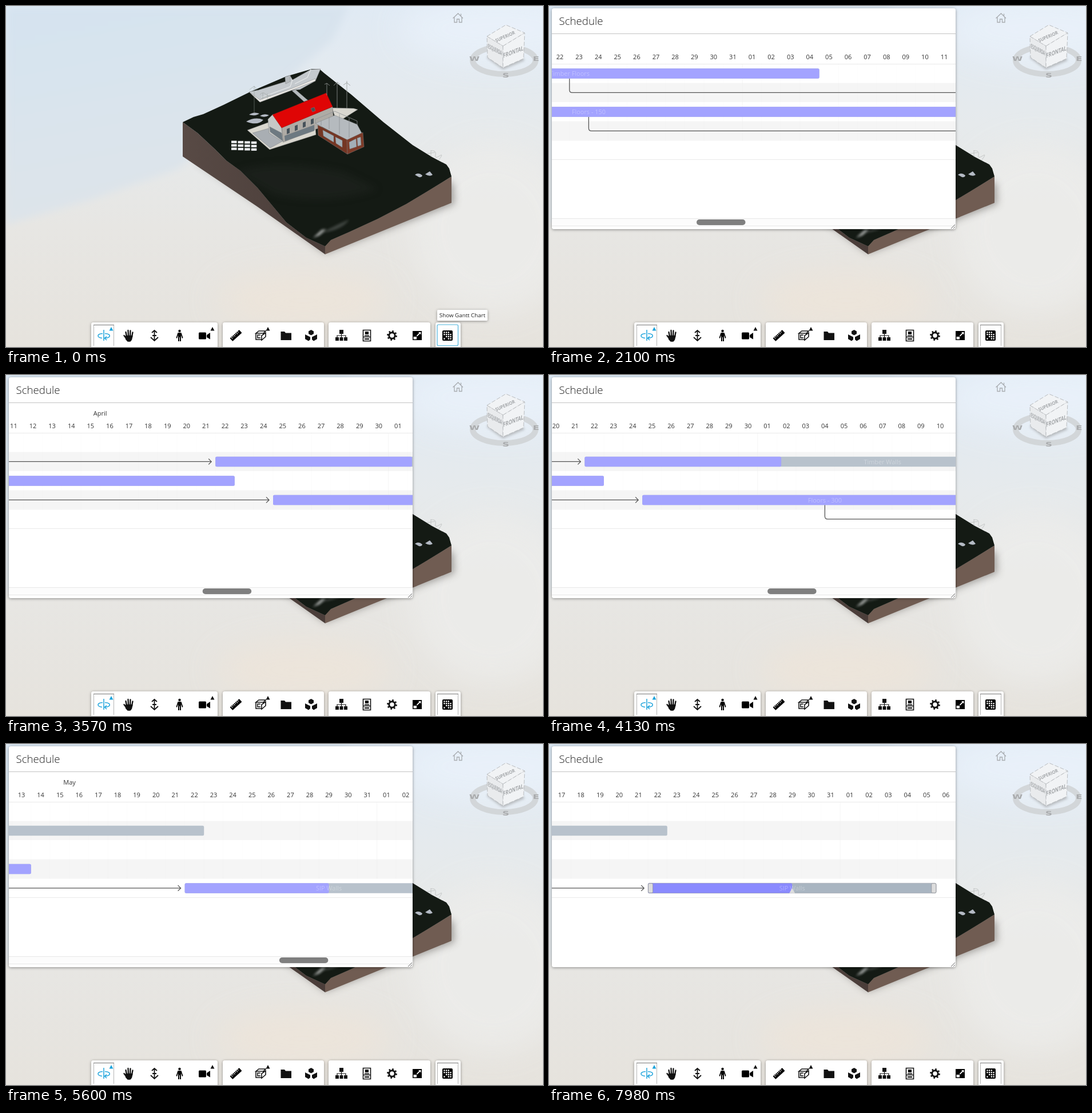
Animation of 939 by 596 pixels, one loop 8000 ms. Source, as an HTML page:

```html
<!DOCTYPE html>
<html lang="en">
<head>
<meta charset="utf-8">
<title>Schedule viewer</title>
<style>
html, body { margin: 0; width: 100%; height: 100%; overflow: hidden; background: #e6e5e2; }
svg { display: block; width: 100vw; height: 100vh; }
text { font-family: "Open Sans", "Noto Sans", sans-serif; }
.mid { text-anchor: middle; }
.date { font-size: 11px; fill: #333; text-anchor: middle; }
.label { font-size: 10.9px; fill: #fff; fill-opacity: .32; text-anchor: middle; }
.compass { font: bold 11px "DejaVu Sans", sans-serif; fill: #a9abad; text-anchor: middle; }
.face { font-weight: 700; fill: #a3a6a9; text-anchor: middle; }
.ink { fill: none; stroke: #111; }
</style>
</head>
<body>
<svg viewBox="0 0 939 596" xmlns="http://www.w3.org/2000/svg">
<defs>
  <linearGradient id="sky" x1="0" y1="0" x2="0" y2="1">
    <stop offset="0" stop-color="#e0eaf4"/><stop offset=".35" stop-color="#e6eaec"/>
    <stop offset=".65" stop-color="#e7e6e3"/><stop offset="1" stop-color="#e6e3dd"/>
  </linearGradient>
  <linearGradient id="blue" x1="0" y1="0" x2=".3" y2="1">
    <stop offset="0" stop-color="#d5e3f0"/><stop offset="1" stop-color="#dee4e9"/>
  </linearGradient>
  <linearGradient id="side" x1="0" y1="0" x2="1" y2="0">
    <stop offset="0" stop-color="#584a45"/><stop offset="1" stop-color="#4a3d39"/>
  </linearGradient>
  <filter id="b2" x="-50%" y="-50%" width="200%" height="200%"><feGaussianBlur stdDeviation="2"/></filter>
  <filter id="b7" x="-50%" y="-50%" width="200%" height="200%"><feGaussianBlur stdDeviation="7"/></filter>
  <filter id="b30" x="-50%" y="-50%" width="200%" height="200%"><feGaussianBlur stdDeviation="26"/></filter>
  <filter id="drop" x="-10%" y="-20%" width="120%" height="150%"><feDropShadow dx="0" dy="1" stdDeviation="2.5" flood-opacity=".4"/></filter>
  <clipPath id="view"><rect x="5" y="49" width="706" height="322"/></clipPath>
  <clipPath id="land"><path d="M309 203L328 194 345 189 380 173 427 150 490 123 535 110 548 110 556 117 604 155 660 203 711 243 745 264 770 277 775 284 779 298 735 325 700 346 650 372 600 395 568 409 558 420 525 405 490 378 440 318 410 288 385 270 365 250 335 222Z"/></clipPath>
</defs>

<rect width="939" height="596" fill="url(#sky)"/>
<path d="M0 0H600L570 60 430 180 300 285 150 338 0 382Z" fill="url(#blue)" filter="url(#b7)"/>
<ellipse cx="860" cy="40" rx="170" ry="60" fill="#eaf2fb" opacity=".8" filter="url(#b30)"/>
<ellipse cx="850" cy="390" rx="140" ry="150" fill="#ededeb" opacity=".8" filter="url(#b30)"/>
<ellipse cx="520" cy="515" rx="150" ry="50" fill="#efe5d9" opacity=".7" filter="url(#b30)"/>

<!-- terrain -->
<path d="M330 270L440 345 558 432 784 346 782 310 600 260Z" fill="#4e4844" opacity=".5" filter="url(#b7)"/>
<path d="M309 203L335 222 365 250 385 270 410 288 440 318 490 378 525 405 558 420V434L440 351 309 263Z" fill="url(#side)"/>
<path d="M558 420L568 409 600 395 650 372 700 346 735 325 779 298V344L558 434Z" fill="#705c52"/>
<g clip-path="url(#land)">
  <rect x="300" y="100" width="490" height="330" fill="#141a14"/>
  <path d="M400 290Q470 265 590 290L650 320Q560 350 470 330Z" fill="#262a27" opacity=".4" filter="url(#b7)"/>
  <path d="M532 408Q565 388 600 373Q590 390 556 396Z" fill="#777b79" opacity=".45" filter="url(#b2)"/>
  <path d="M537 405L552 391 560 390 548 401Z" fill="#c9cbca" opacity=".8" filter="url(#b2)"/>
</g>

<!-- buildings -->
<g stroke="#7c7f80" stroke-width=".5" stroke-linejoin="round">
  <path d="M425 150L441 147 489 132 488 124 497 122 501 129 533 111 550 110 541 131 514 146 500 147 444 168Z" fill="#c4c9cd"/>
  <path d="M425 150L444 164 500 144 541 127V131L500 147 444 168Z" fill="#eceae6"/>
  <path d="M488 124L497 121V132L489 136ZM500 148L506 146 528 165 521 167Z" fill="#b5babd"/>
  <path d="M533 111L527 125 505 136M501 129L497 141 446 160" fill="none" stroke="#eef0f0" stroke-width="1"/>
  <path d="M570 178L608 179 615 181 588 198 576 196Z" fill="#d9d7d0"/>
  <path d="M422 217L460 203 462 214 486 230 541 213 542 225 461 251Z" fill="#d9d7cf"/>
  <path d="M431 222L459 214 488 234 462 248Z" fill="#a9aeb3"/>
  <path d="M458 198L467 189 482 212 485 238 460 222Z" fill="#c6c8c6"/>
  <path d="M482 212L571 176 573 203 485 238Z" fill="#aeaba5"/>
  <path d="M461 211L482 222 484 236 462 220ZM487 227L539 208V218L488 236Z" fill="#6d7981"/>
  <path d="M466 190L560 152 571 176 482 213Z" fill="#df0505" stroke="#8f1512"/>
  <path d="M533 179L539 177 541 183 536 185Z" fill="#4a4e52"/>
  <path d="M541 205L575 191 614 207 622 222 597 235Z" fill="#b5babe"/>
  <path d="M545 208L597 234V259L546 226Z" fill="#743624"/>
  <path d="M596 234L624 221 626 246 597 259Z" fill="#7d3b28"/>
  <path d="M554 217L573 227V238L555 227ZM576 229L588 235V247L577 240ZM600 238L612 232 613 246 601 250ZM614 231L620 229 621 243 615 245Z" fill="#a3afb7"/>
  <path d="M541 205L541 198 575 184 614 201V208M551 200V209M565 194V215M583 189V224M600 196V230" fill="none" stroke="#8d9295" stroke-width=".8"/>
</g>
<g id="windows" fill="#47525a"></g>
<g id="solar" fill="#f0f2f5"></g>
<path d="M425 190Q433 184 443 188Q437 193 425 190ZM444 192Q452 187 460 191Q452 196 444 192ZM420 202Q436 193 450 199Q440 210 420 202ZM715 295Q721 290 728 296Q727 300 722 299ZM733 294L741 289 746 295Q741 299 733 294Z" fill="#b4bac4"/>
<g fill="none" stroke="#969b98" stroke-width=".8">
  <path d="M561 156V135M557 137L561 135 566 139M579 178V133M573 139L579 133 584 137M596 179V134M590 138L596 134 602 139M596 134V131"/>
  <path d="M434 187V140L426 146M434 140L441 149M444 155Q449 149 454 154T463 157M446 161L462 155M449 152V163M457 153V164" opacity=".65"/>
  <path d="M743 264V252M736 258L750 256M743 253Q753 252 751 260T758 262 756 270" opacity=".55"/>
</g>

<!-- home and view cube -->
<path d="M781.500 21.500L790.500 13 799 21.500M784 20V28.500H788.500V23H792.500V28.500H797V20M795.500 17V13.500" fill="none" stroke="#a8acb0" stroke-width="1.300"/>
<ellipse cx="871" cy="95" rx="55" ry="24" fill="none" stroke="#cdcfd0" stroke-width="10" opacity=".75"/>
<path d="M841 91L869 111 907 95 900 86 846 84Z" fill="#888" opacity=".5" filter="url(#b2)"/>
<g fill="#f1f3f5" stroke="#babdc0" stroke-width="1" stroke-dasharray="7 3" stroke-linejoin="round">
  <path d="M841 53L874 33 907 47 869 70Z"/>
  <path d="M841 53L869 70V108L842 90Z" fill="#e9ebed"/>
  <path d="M869 70L907 47 905 92 869 108Z"/>
</g>
<text class="face" font-size="10" transform="matrix(.68 -.3 .35 .75 874 56)">SUPERIOR</text>
<text class="face" font-size="11" transform="matrix(.42 .22 0 1 855 80)">ESQUERDA</text>
<text class="face" font-size="11" transform="matrix(.7 -.27 0 1 887 84)">FRONTAL</text>
<text class="compass" transform="matrix(1.500 0 0 1 819 96)">W</text>
<text class="compass" transform="matrix(1.500 0 0 1 927 96)">E</text>
<text class="compass" transform="matrix(1.500 0 0 1 874 125)">S</text>

<!-- toolbar -->
<g fill="#fff" filter="url(#drop)">
  <rect x="149" y="553" width="221" height="50" rx="4"/><rect x="379" y="553" width="177" height="50" rx="4"/>
  <rect x="564" y="553" width="178" height="50" rx="4"/><rect x="751" y="553" width="44" height="50" rx="4"/>
</g>
<path d="M153.500 594V557.500H188.500V594" fill="#fff" stroke="#b5b5b5"/><path d="M153 557.500H189" stroke="#777"/>
<g id="pressed"><path d="M754.500 594V557.500H790.500V594" fill="#fff" stroke="#b5b5b5"/><path d="M754 557.500H791" stroke="#777"/></g>
<rect id="focus" x="754" y="557" width="36.500" height="36.500" rx="2" fill="none" stroke="#4db3dc" stroke-width="1.200"/>
<path d="M184 561L187.500 567.500H180.500Z" fill="#1fa4dc"/>
<path d="M361 561L364.500 567.500H357.500ZM458 561L461.500 567.500H454.500Z" fill="#111"/>
<path transform="translate(171 576)" d="M-3 4.500C-13 3-12-3-2-3.500M2-3.500C13-3 13 4 2 4.500M0-10V9M5 1.500L1.500 4.500 5 8" fill="none" stroke="#1fa4dc" stroke-width="1.500"/>
<g transform="translate(215 576)" fill="none" stroke="#111" stroke-width="2.300" stroke-linecap="round" stroke-linejoin="round">
  <path d="M-4 2L-5.500-6M-1 1L-1.500-9M2 1L2.500-8.500M5 2L6.500-5.500M-4 6L-8.500 0"/>
  <path d="M-5 1H5.500L4 7 2 9.500H-2L-5 6Z" fill="#111"/>
</g>
<path class="ink" d="M259.500 568V584M255 571L259.500 567 264 571M253 579L259.500 585 266 579M256 576H263" stroke-width="1.800"/>
<g transform="translate(303.500 576)"><circle cy="-8" r="2.200"/><path d="M-3-5H3L6 4 4.500 5 2.500-1V10H.5V3H-.5V10H-2.500V-1L-4.500 5-6 4Z"/></g>
<g transform="translate(347 576)"><rect x="-10" y="-5.500" width="13" height="12" rx="1.500"/><path d="M4-1L10-5V6.500L4 3Z"/></g>
<g transform="translate(402 576) rotate(-42)"><rect x="-11" y="-3.500" width="22" height="7" rx=".8"/><path d="M-8-3.500V0M-5-3.500V-1M-2-3.500V0M1-3.500V-1M4-3.500V0M7-3.500V-1" stroke="#fff"/></g>
<path class="ink" d="M437 572L442 568H454L450 572ZM437 572V583H447M450 572V575M447 576L454 571V578L447 584ZM445 575H440V580H445" stroke-width="1.600"/>
<path d="M480.500 569H487L489 571.500H499V584H480.500Z" fill="#111"/>
<path d="M533.500 566L538 568.500V573L533.500 575.500 529 573V568.500ZM523 574L528 576.500 532 578.500V583L529 585.500 523 582ZM544 574L539 576.500 535 578.500V583L538 585.500 544 582Z" fill="#111"/>
<path d="M583 566H590V573H583ZM576 579H582V585H576ZM583.500 579H589.500V585H583.500ZM591 579H597V585H591Z" fill="#111"/>
<path class="ink" d="M586.500 573V579M579 579V576H594V579" stroke-width="1.200"/>
<path class="ink" d="M624.500 566.500H637.500V585.500H624.500ZM624.500 578.500H637.500" stroke-width="1.600"/><path d="M628 569H634V574H628ZM627 575.500H635V577H627ZM627 581H635V583H627Z"/>
<circle class="ink" cx="675" cy="576" r="5.200" stroke-width="3"/>
<circle class="ink" cx="675" cy="576" r="7.500" stroke-width="2.800" stroke-dasharray="2.600 3.290"/>
<path d="M711 568H727V584H711Z"/><path d="M712.500 578H718V582.500H712.500ZM721 570H725.500V574.500L723.800 572.800 719 577.500 717.800 576.300 722.500 571.500Z" fill="#fff"/>
<rect x="763" y="567" width="18" height="18" rx="2"/><g id="dots" fill="#fff"></g>
<g id="tip"><rect x="754" y="531" width="88" height="19" rx="2" fill="#fff" filter="url(#drop)"/><text class="mid" x="798" y="544" font-size="9.800" fill="#222">Show Gantt Chart</text></g>

<!-- schedule panel -->
<g id="panel">
  <rect x="5" y="4" width="706" height="386" rx="4" fill="#fff" filter="url(#drop)"/>
  <text x="17.500" y="33" font-size="18.700" font-weight="300" fill="#222">Schedule</text>
  <path d="M5 48.500H711" stroke="#c3c3c3"/>
  <path d="M5 134.500H711V168H5ZM5 201.500H711V235.500H5Z" fill="#f5f5f5"/>
  <path d="M5 101.500H711M5 268.500H711" stroke="#e9e9e9"/>
  <g clip-path="url(#view)"><g id="chart"></g></g>
  <g id="bar">
    <path d="M5 371.500H711V384.500H5" fill="#fcfcfc" stroke="#e7e7e7"/>
    <rect id="thumb" y="373" width="85.500" height="10" rx="5" fill="#7f7f7f"/>
  </g>
  <path d="M703 389L710 382M707 389L710 386" stroke="#555" stroke-width=".9"/>
</g>
</svg>
<script>
const $ = id => document.getElementById(id);
const DAY = 33.6, LOOP = 8000, STEP = 70;
const rowY = row => 109.2 + row * 33.5;

function add(parent, tag, attrs, text) {
  const el = document.createElementNS("http://www.w3.org/2000/svg", tag);
  for (const k in attrs) el.setAttribute(k, attrs[k]);
  if (text) el.textContent = text;
  return parent.appendChild(el);
}

// Small repeated details
for (let r = 0; r < 3; r++) for (let c = 0; c < 4; c++)
  add($("solar"), "rect", { x: 394 + c * 11.6, y: 235.5 + r * 6 + c * .4, width: 9.5, height: 4.2 });
for (let i = 0; i < 4; i++)
  add($("windows"), "path", { d: `M${491 + i * 14} ${215 - i * 5.6}l5 -2v9l-5 2z` });
for (let r = 0; r < 4; r++) for (let c = 0; c < 4; c++)
  if ((r * 3 + c * 2) % 5 !== 1)
    add($("dots"), "rect", { x: 765.3 + c * 3.7, y: 569.3 + r * 3.7, width: 2.3, height: 2.3 });

// Chart: positions are counted in days from 21 February
const chart = $("chart");
for (let n = -30; n < 125; n++) {
  const day = new Date(Date.UTC(2021, 1, 21 + n)).getUTCDate();
  const edge = (n - .5) * DAY;
  add(chart, "path", { d: `M${edge} 101V235.500`, stroke: "#eee", "stroke-width": day === 1 ? .6 : .12 });
  add(chart, "text", { x: n * DAY, y: 93, class: "date" }, String(day).padStart(2, "0"));
}
[["February", -5.5], ["March", 22.5], ["April", 53.5], ["May", 83.5], ["June", 114.5]]
  .forEach(([name, at]) => add(chart, "text", { x: at * DAY, y: 71, class: "date" }, name));

const tasks = [
  ["Timber Floors", 16.5, 42.5, 1],
  ["Timber Walls", 59.5, 90.5, .33],
  ["Floors - 150", .5, 60.5, 1],
  ["Floors - 300", 62.5, 81.5, 1],
  ["SIP Walls", 89.5, 104.5, .5]
];
[[0, 1], [2, 3], [3, 4]].forEach(([a, b]) => {
  const x = (tasks[a][1] + tasks[a][2]) / 2 * DAY, tip = tasks[b][1] * DAY - 7, y = rowY(b) + 8.7;
  add(chart, "path", {
    d: `M${x} ${rowY(a) + 17}V${y - 5}q0 5 5 5H${tip}m-5 -5l5 5l-5 5`,
    fill: "none", stroke: "#555", "stroke-width": 1.3
  });
});
const boxes = tasks.map(([name, from, to, done], row) => {
  const x = from * DAY, w = (to - from) * DAY, y = rowY(row);
  const rect = (width, fill) => add(chart, "rect", { x, y, width, height: 17.5, rx: 2.5, fill });
  const parts = { base: rect(w, "#b8c2cc"), done: rect(w * done, "#a3a3ff") };
  if (row === 4) {
    parts.grips = add(chart, "g", { fill: "#ddd", stroke: "#8b8f94", "stroke-width": .7, opacity: 0 });
    add(parts.grips, "rect", { x, y, width: w, height: 17.5, rx: 2.5, fill: "none", "stroke-opacity": .6 });
    for (const gx of [x + .4, x + w - 8.4])
      add(parts.grips, "rect", { x: gx, y: y + .5, width: 8, height: 16.5, rx: 2 });
    const end = x + w * done;
    add(parts.grips, "path", { d: `M${end - 5} ${y + 17.5}h10l-5 -8.700z`, stroke: "none" });
  }
  add(chart, "text", { x: x + w / 2, y: y + 12.8, class: "label" }, name);
  return parts;
});

// Time and scroll position; smooth monotone curve between them
const keys = [[980, 24], [1050, 21.5], [2100, -955.4], [3570, -1633], [4690, -2245.8], [5600, -2694.6], [6790, -2834]];
const rate = i => (keys[i + 1][1] - keys[i][1]) / (keys[i + 1][0] - keys[i][0]);
function slope(i) {
  if (i === 0 || i === keys.length - 1) return 0;
  const a = rate(i - 1), b = rate(i);
  return 2 * a * b / (a + b);
}
function scrollAt(t) {
  const last = keys.length - 1;
  if (t <= keys[0][0]) return keys[0][1];
  if (t >= keys[last][0]) return keys[last][1];
  const i = keys.findIndex((k, j) => t < keys[j + 1][0]);
  const [t0, a] = keys[i], [t1, b] = keys[i + 1];
  const h = t1 - t0, u = (t - t0) / h, v = 1 - u;
  return v * v * (1 + 2 * u) * a + u * u * (3 - 2 * u) * b + h * u * v * (v * slope(i) - u * slope(i + 1));
}

const ramp = (t, a, b) => Math.max(0, Math.min(1, (t - a) / (b - a)));
const mix = (a, b, k) => `rgb(${a.map((v, i) => Math.round(v + (b[i] - v) * k))})`;
const show = (id, on) => $(id).setAttribute("visibility", on ? "visible" : "hidden");

function draw(time) {
  const t = Math.floor((time % LOOP) / STEP) * STEP;
  const x = scrollAt(t), hover = ramp(t, 6860, 7210);
  show("panel", t >= 210);
  show("pressed", t >= 210);
  show("focus", t < 490);
  show("tip", t < 490);
  chart.setAttribute("transform", `translate(${x.toFixed(2)} 0)`);
  $("thumb").setAttribute("x", (134.5 + (21.5 - x) / 7.91).toFixed(2));
  $("bar").setAttribute("opacity", ramp(t, 560, 840) * (1 - ramp(t, 7350, 7840)));
  const box = boxes[4];
  box.base.setAttribute("fill", mix([184, 194, 204], [169, 181, 193], hover));
  box.done.setAttribute("fill", mix([163, 163, 255], [138, 138, 255], hover));
  box.grips.setAttribute("opacity", hover);
}
function tick() {
  draw(performance.now());
  requestAnimationFrame(tick);
}
tick();
</script>
</body>
</html>
```
